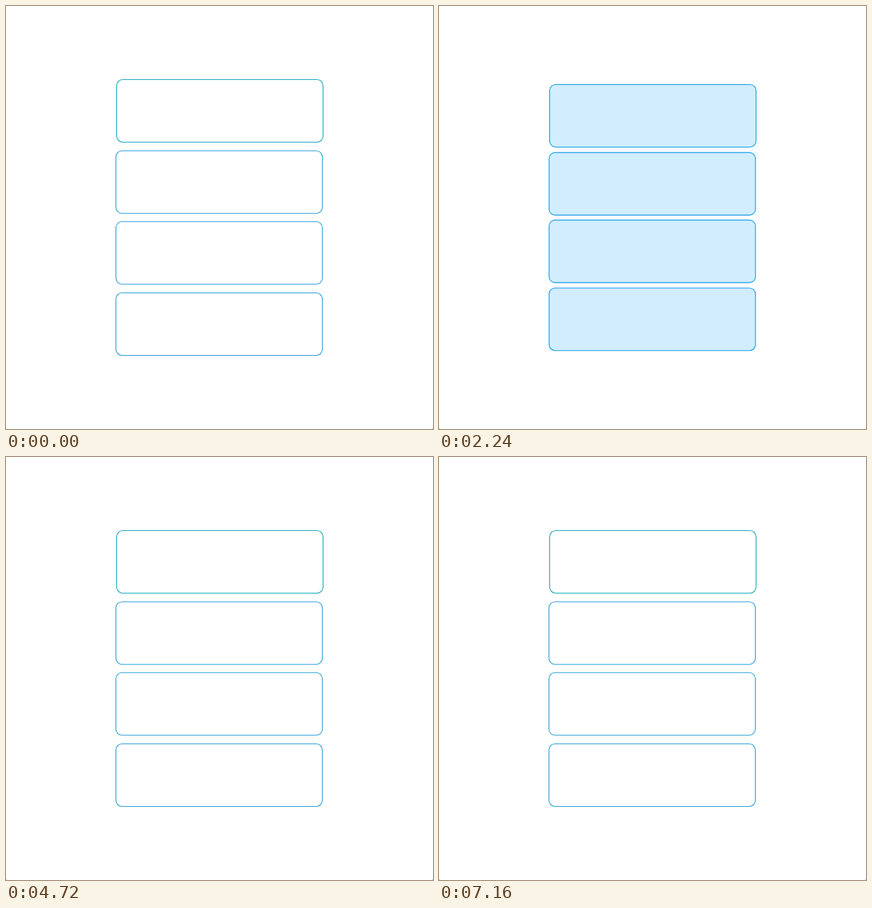
Animation of 600x595 px, one loop 7.56 s. Source, as an HTML page:

```html
<!DOCTYPE html>
<html lang="en">
<head>
<meta charset="utf-8">
<title>Stacking cards</title>
<style>
  html, body { margin: 0; width: 100%; height: 100%; overflow: hidden; background: #fff; }
  svg { display: block; }
</style>
</head>
<body>
<svg id="stage" width="600" height="595" viewBox="0 0 600 595">
  <path d="M0 593.5h1v1.5h-1zM599 593.5h1v1.5h-1z" fill="#ccc"/>
</svg>
<script>
const LOOP = 7560, STEP = 40, FADE = 300;
const WHITE = [255, 255, 255], BLUE = [0, 152, 252];
const TEAL = [28, 168, 186], SKY = [42, 159, 214];

// [start of move, stacked state it leads to]
const moves = [[880, 1], [2084, 0], [3240, 1], [4368, 0], [5680, 1], [6844, 0]];

// x and y when spread out, then when stacked
const cards = [
  { from: [155.5, 103.5], to: [155.5, 142.4], line: TEAL },
  { from: [154.5, 203.7], to: [155.5, 217.3], line: SKY },
  { from: [154.5, 303.3], to: [155.5, 291.2], line: SKY },
  { from: [154.5, 403.5], to: [155.5, 365.6], line: SKY }
];

const stage = document.getElementById('stage');
const lerp = (a, b, p) => a + (b - a) * p;
const mix = (a, b, p) => `rgb(${a.map((v, i) => Math.round(lerp(v, b[i], p)))})`;

// Lower cards go in first so that upper ones cover them.
for (const card of [...cards].reverse()) {
  card.el = document.createElementNS(stage.namespaceURI, 'rect');
  const fixed = { width: 290, height: 88, rx: 8.5, 'stroke-width': 1.1 };
  for (const key in fixed) card.el.setAttribute(key, fixed[key]);
  stage.append(card.el);
}

// cubic-bezier(.25, .1, .25, 1)
function ease(x) {
  if (x <= 0 || x >= 1) return x <= 0 ? 0 : 1;
  let lo = 0, hi = 1;
  for (let i = 0; i < 24; i++) {
    const s = (lo + hi) / 2;
    if (0.75 * s * (1 - s) + s ** 3 < x) lo = s; else hi = s;
  }
  return 0.3 * lo * (1 - lo) ** 2 + 3 * lo * lo * (1 - lo) + lo ** 3;
}

function stackedAt(t) {
  let p = 0;
  for (const [start, target] of moves) {
    if (t >= start) p = lerp(1 - target, target, ease((t - start) / FADE));
  }
  return p;
}

function draw(t) {
  const p = stackedAt(t);
  for (const { el, from, to, line } of cards) {
    el.setAttribute('x', lerp(from[0], to[0], p));
    el.setAttribute('y', lerp(from[1], to[1], p));
    el.setAttribute('fill', mix(WHITE, BLUE, p));
    el.setAttribute('stroke', mix(line, BLUE, Math.min(1, p * 3)));
  }
}

const origin = performance.now();
function tick() {
  const t = (performance.now() - origin) % LOOP;
  draw(Math.floor(t / STEP) * STEP);
  requestAnimationFrame(tick);
}
tick();
</script>
</body>
</html>
```
